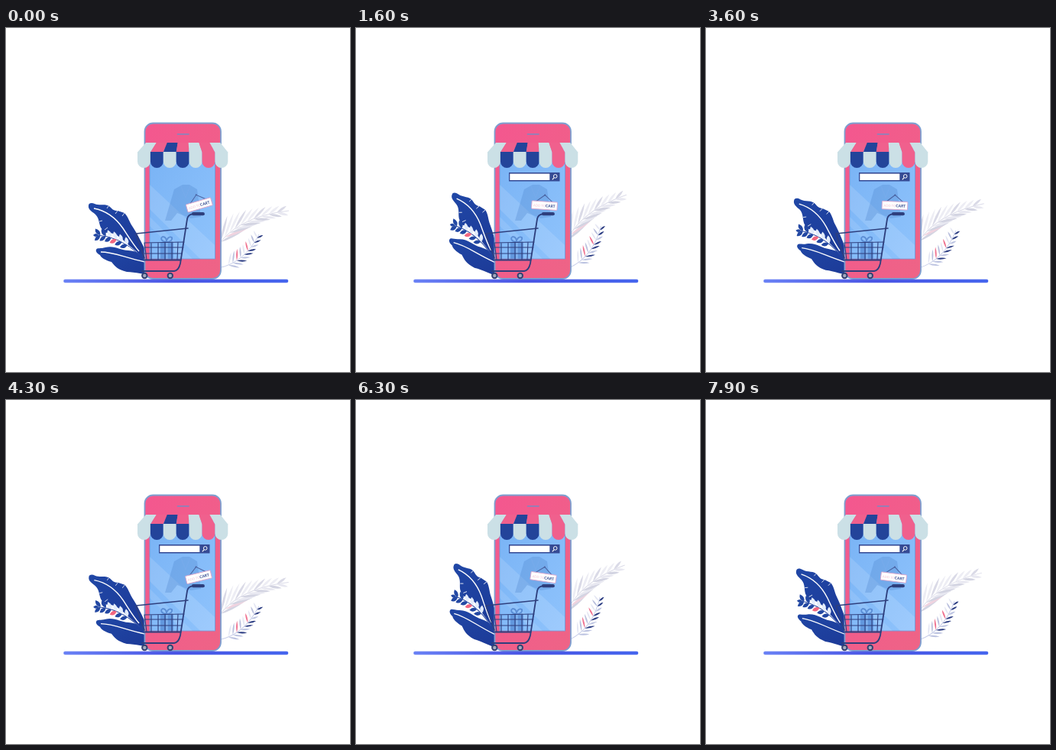
An HTML page for the animation above (8 s loop, 450 by 450 pixels).

```html
<!DOCTYPE html>
<html lang="en">
<head>
<meta charset="utf-8">
<title>Mobile shop</title>
<style>
html, body { margin: 0; width: 100%; height: 100%; overflow: hidden; background: #fff; }
svg { display: block; width: 100vw; height: 100vh; }
text { font: 700 6px Lato, "Open Sans", sans-serif; }
</style>
</head>
<body>
<svg viewBox="0 0 450 450">
  <defs>
    <linearGradient id="pink" x2="1" y2="1">
      <stop stop-color="#f4578f"/><stop offset="1" stop-color="#ee6486"/>
    </linearGradient>
    <linearGradient id="glass" x2="1" y2="1">
      <stop stop-color="#79b3f5"/><stop offset="1" stop-color="#8fc3fc"/>
    </linearGradient>
    <linearGradient id="ground">
      <stop stop-color="#6b82f5"/><stop offset=".5" stop-color="#4a55e4"/><stop offset="1" stop-color="#4666ee"/>
    </linearGradient>
    <linearGradient id="leaf" x2="1" y2="1">
      <stop stop-color="#2047a6"/><stop offset="1" stop-color="#1c3996"/>
    </linearGradient>
    <clipPath id="screen"><rect x="188" y="158" width="85.5" height="144"/></clipPath>
  </defs>

  <!-- left foliage -->
  <g id="left">
    <path fill="url(#leaf)" d="M108 232C108 229 112 228 116 230C123 233 131 229 136 234C139 237 141 239 146 239L155 242C160 247 161 253 165 259C171 268 177 279 186 299L178 300C167 291 155 287 145 279C138 273 128 268 124 261C121 254 122 248 116 243C112 240 107 237 108 232Z"/>
    <path fill="none" stroke="#fff" stroke-width="1.4" d="M115 236C131 239 144 249 153 262C159 271 166 283 174 292"/>
    <path fill="none" stroke="#fff" stroke-width=".8" d="M134 233L132 236M146 239L143 243M155 242L152 246M122 253L126 252M129 264L133 261"/>
    <path fill="#fff" d="M119 274C131 262 146 269 157 281L175 296L160 293C145 286 130 292 119 280Z"/>
    <path fill="url(#leaf)" d="M118 290C119 287 124 289 130 287C142 284 150 291 160 291C171 292 181 296 192 304L194 323C181 323 169 319 158 319C146 316 143 312 138 306C130 304 124 300 123 297C119 295 117 292 118 290Z"/>
    <path fill="none" stroke="#fff" stroke-width="1.3" d="M124 293C141 293 154 300 182 306"/>
    <g id="sprig"></g>
  </g>

  <!-- right foliage -->
  <g id="palm"></g>
  <g id="fern"></g>

  <!-- phone -->
  <rect x="181.5" y="124.5" width="99.5" height="203.5" rx="11" fill="url(#pink)" stroke="#7d9fd0" stroke-width="1.8"/>
  <path stroke="#8c83bb" stroke-width="1.8" stroke-linecap="round" d="M224.5 138.8H239"/>
  <rect x="188" y="158" width="85.5" height="144" fill="url(#glass)" stroke="#7795d2" stroke-width=".9"/>
  <g clip-path="url(#screen)">
    <path fill="#fff" opacity=".13" d="M188 205L273 284V302H254L188 237Z"/>
    <path fill="#fff" opacity=".1" d="M188 247L244 302H232L188 259Z"/>
    <path fill="#4b80cb" opacity=".3" d="M220 211L231 205H240L250 211L255 247L242 249L224 242L216 252H208Z"/>
    <path fill="none" stroke="#78abec" stroke-width="1" d="M229 207L235 222L241 206"/>
  </g>
  <g id="bar">
    <rect x="200" y="189" width="66.5" height="11.5" fill="#354a94"/>
    <rect x="201.3" y="190.6" width="52" height="8.4" fill="#fff"/>
    <circle cx="260.7" cy="193.9" r="2.3" fill="none" stroke="#fff" stroke-width="1"/>
    <path stroke="#fff" stroke-width="1.1" d="M259 195.8L256.8 198.3"/>
  </g>

  <g id="awning"></g>

  <!-- gift and cart -->
  <g fill="#5c91d9" opacity=".85">
    <rect x="202" y="280" width="17" height="22"/>
    <path fill="none" stroke="#5385cf" stroke-width="1.8" d="M210 280C204 280 201 275 205 273C209 273 210 277 210 280C210 276 213 272 217 274C218 278 214 280 210 280"/>
    <path stroke="#86b8f3" stroke-width="2" d="M210.5 281V302"/>
  </g>
  <g fill="none" stroke="#2e3f7d" stroke-linecap="round" stroke-linejoin="round">
    <path stroke-width="1.1" d="M181 281L184 303M181 287H232M181 295H230M190 281V303M199 281V303M208 280V303M217 280V303M225 280L224 303M181 281L233 280"/>
    <path stroke-width="1.6" d="M170 269L238 262M170 269L181 301"/>
    <path stroke-width="1.8" d="M181 303.5H229M178 318H220Q226 317 228 308L237 250Q238 244 245 243.2"/>
    <path stroke-width="4.2" d="M245 243.2H257.8"/>
  </g>
  <g fill="#a3a9bd" stroke="#334171" stroke-width="2">
    <circle cx="181.3" cy="324" r="3.2"/><circle cx="214.8" cy="324" r="3.2"/>
  </g>

  <!-- hanging sign, drawn level -->
  <g id="sign">
    <path fill="none" stroke="#49619f" stroke-width="1" d="M236 228L247.5 218.5L259 228"/>
    <circle cx="247.5" cy="218.5" r="1" fill="#49619f"/>
    <rect x="231" y="227" width="33.5" height="10.4" rx=".8" fill="#fff" stroke="#d9a6cd" stroke-width=".9"/>
    <text x="233" y="234.3" fill="#f4cfdd" style="font-size:4.3px">ADD TO</text>
    <text x="249" y="234.3" fill="#30488f" style="font-size:5px">CART</text>
  </g>

  <path d="M77.5 328.7H367a2.2 2.2 0 0 1 0 4.6H77.5a2.2 2.2 0 0 1 0-4.6Z" fill="url(#ground)"/>
</svg>
<script>
const $ = id => document.getElementById(id);
const LOOP = 8000, SWAY = 4500;

function add(parent, attrs) {
  const el = document.createElementNS("http://www.w3.org/2000/svg", "path");
  for (const key in attrs) el.setAttribute(key, attrs[key]);
  $(parent).append(el);
}

// A slim leaflet growing from (x, y) in direction deg
function leaflet(parent, x, y, deg, length, width, fill) {
  add(parent, {
    d: `M0 0Q${length * .55} ${-width} ${length} 0Q${length * .45} ${width} 0 0`,
    transform: `translate(${x} ${y}) rotate(${deg})`, fill
  });
}

// Point and heading on a quadratic curve
function along([ax, ay, bx, by, cx, cy], u) {
  const v = 1 - u;
  return {
    x: v * v * ax + 2 * u * v * bx + u * u * cx,
    y: v * v * ay + 2 * u * v * by + u * u * cy,
    deg: Math.atan2(v * (by - ay) + u * (cy - by), v * (bx - ax) + u * (cx - bx)) * 180 / Math.PI
  };
}

function stem(parent, [ax, ay, bx, by, cx, cy], stroke, width) {
  add(parent, { d: `M${ax} ${ay}Q${bx} ${by} ${cx} ${cy}`, fill: "none", stroke, "stroke-width": width });
}

const sprig = [175, 297, 148, 272, 119, 271];
stem("sprig", sprig, "#2a4aa2", 1);
for (let i = 0; i < 6; i++) {
  const p = along(sprig, .3 + i * .125);
  leaflet("sprig", p.x, p.y, p.deg + 48, 11, 5, i < 4 ? "#e3ecfb" : "#2348a3");
  leaflet("sprig", p.x, p.y, p.deg - 48, 10, 5, i == 2 ? "#f2667f" : "#2348a3");
}
leaflet("sprig", 121, 271, 180, 7, 4, "#2348a3");

const palm = [272, 292, 298, 247, 370, 239];
stem("palm", palm, "#dcdce9", 1);
for (let i = 0; i < 10; i++) {
  const p = along(palm, .14 + i * .083), length = 36 - i * 2.3;
  leaflet("palm", p.x, p.y, p.deg - 24, length, 3.2, i % 3 ? "#ededf4" : "#dadae7");
  leaflet("palm", p.x, p.y, p.deg + 24, length, 3.4, i == 1 ? "#f0d3df" : i % 2 ? "#e8e8f1" : "#d3d4e2");
}

const fern = [278, 314, 312, 307, 331, 270];
stem("fern", fern, "#c9cfea", 1);
for (let i = 0; i < 9; i++) {
  const p = along(fern, .2 + i * .092), length = 15 - i * .8;
  leaflet("fern", p.x, p.y, p.deg - 55, length + 2, 2, i == 2 || i == 5 ? "#f0718f" : i % 2 ? "#b9bfdd" : "#e4e6f3");
  leaflet("fern", p.x, p.y, p.deg + 36, length, 2.2, i > 1 && i % 3 ? "#2b3c82" : "#bcc3e1");
}

const PINK = "#f0608d", NAVY = "#23449a", PALE = "#cbe0e6";
const roof = [PALE, PINK, NAVY, PINK, PALE, PINK, PALE];
const flaps = [PALE, NAVY, PALE, NAVY, PALE, PINK, PALE];
for (let i = 0; i < 7; i++) {
  const top = 183 + i * 13.9, low = 172 + i * 16.9;
  add("awning", { d: `M${top} 150h13.9L${low + 16.9} 162.5h-16.9Z`, fill: roof[i] });
  add("awning", { d: `M${low} 162h16.9v12.5a8.45 8.6 0 0 1-16.9 0Z`, fill: flaps[i] });
}

const wave = (t, start) => Math.cos((t - start) / SWAY * 2 * Math.PI);
const turn = (id, deg, x, y) => $(id).setAttribute("transform", `rotate(${deg} ${x} ${y})`);

function draw(now) {
  const t = Math.floor(now / 100) * 100 % LOOP;
  const lift = 8 * (1 - wave(t, 0));
  turn("left", lift, 180, 303);
  turn("palm", -lift, 270, 300);
  turn("fern", -lift, 278, 311);
  turn("sign", -18 * wave(t, 320), 247.5, 214);

  const u = Math.min(1, Math.max(0, (t - 400) / 850));
  const grow = u * u * (3 - 2 * u);
  $("bar").setAttribute("transform", `translate(200 0) scale(${grow} 1) translate(-200 0)`);
  $("bar").setAttribute("visibility", grow ? "visible" : "hidden");
  requestAnimationFrame(draw);
}
draw(0);
</script>
</body>
</html>
```
